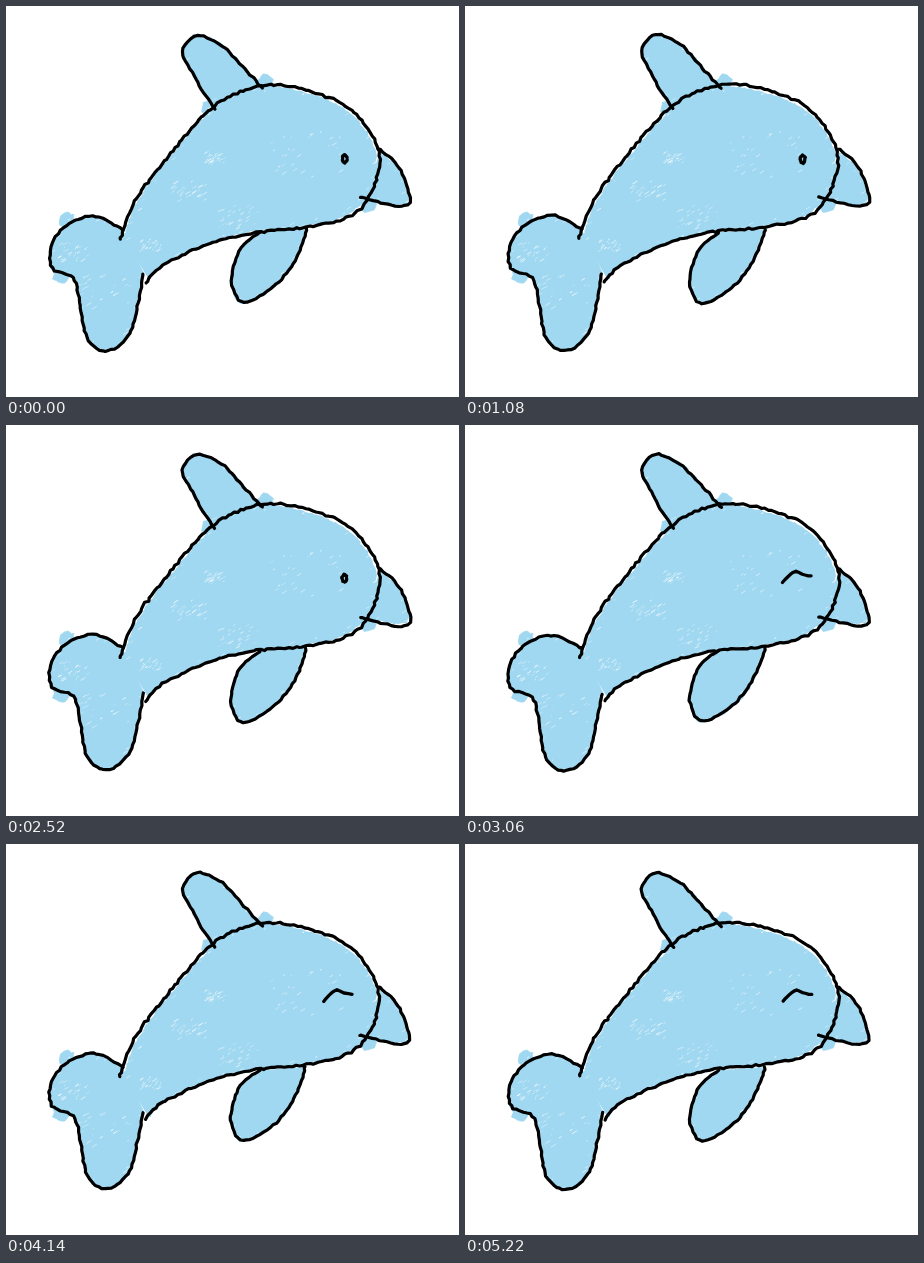
Recreate the animation shown at these times as an HTML page with a canvas. Size 453 by 391 pixels, loop 5.4 s.

```html
<!DOCTYPE html>
<html lang="en">
<head>
<meta charset="utf-8">
<title>Dolphin</title>
<style>
html, body { margin: 0; width: 100%; height: 100%; overflow: hidden; background: #fff; }
canvas { display: block; }
</style>
</head>
<body>
<canvas id="stage" width="453" height="391"></canvas>
<script>
const STEP = 180, FRAMES = 30;
const BLUE = '#a0d8f1';
const ctx = document.getElementById('stage').getContext('2d');

const body = [114,233, 129,195, 164,147, 204,103, 240,83, 275,79, 313,88, 348,106, 372,142,
  369,178, 346,209, 300,221, 244,227, 197,240, 157,259, 139,276];
const tail = [137,268, 132,297, 122,330, 100,345, 81,331, 74,296, 67,272, 46,262, 46,237,
  64,217, 90,210, 117,223];
const fin = [208,103, 188,70, 177,45, 191,29, 216,39, 238,62, 256,82];
const flipper = [254,226, 234,243, 225,276, 238,297, 270,279, 290,252, 300,223];
const beak = [373,143, 393,162, 404,192, 398,200, 378,198, 354,192];
const shapes = [body, tail, fin, flipper, beak];
const closedEye = [318,157, 323,151, 331,146, 337,149, 346,150];

// Colour outside the lines, and bare paper showing through: x, y, radius
const smudges = [61,215,8, 55,269,8, 259,77,8, 362,198,8, 203,102,7, 184,46,7];
const bare = [145,239,10, 232,212,20, 208,152,10, 68,246,15, 100,285,28, 300,148,38, 184,185,17];

function random(seed) {
  return () => {
    seed = seed + 0x6D2B79F5 | 0;
    let t = Math.imul(seed ^ seed >>> 15, 1 | seed);
    t = t + Math.imul(t ^ t >>> 7, 61 | t) ^ t;
    return ((t ^ t >>> 14) >>> 0) / 2147483648 - 1;
  };
}

function groups(list, size) {
  const out = [];
  for (let i = 0; i < list.length; i += size) out.push(list.slice(i, i + size));
  return out;
}

// Catmull-Rom curve sampled about every `gap` pixels
function sample(pts, gap) {
  const out = [], last = pts.length - 1;
  for (let i = 0; i < last; i++) {
    const a = pts[Math.max(i - 1, 0)], b = pts[i], c = pts[i + 1], d = pts[Math.min(i + 2, last)];
    const n = Math.max(1, Math.round(Math.hypot(c[0] - b[0], c[1] - b[1]) / gap));
    for (let k = 0; k < n; k++) {
      const t = k / n;
      out.push([0, 1].map(j => b[j] + t / 2 * (c[j] - a[j] +
        t * (2 * a[j] - 5 * b[j] + 4 * c[j] - d[j] + t * (3 * (b[j] - c[j]) + d[j] - a[j])))));
    }
  }
  out.push(pts[last]);
  return out;
}

const shift = (pts, rnd, size) => pts.map(([x, y]) => [x + rnd() * size, y + rnd() * size]);

function shrink(pts, scale) {
  const mid = [0, 1].map(j => pts.reduce((sum, p) => sum + p[j], 0) / pts.length);
  return pts.map(p => p.map((v, j) => mid[j] + (v - mid[j]) * scale));
}

function trace(c, pts) {
  c.beginPath();
  pts.forEach(([x, y]) => c.lineTo(x, y));
}

function ring(x, y, r) {
  return Array.from({ length: 16 }, (_, i) => [x + r * Math.cos(i * Math.PI / 8), y + r * Math.sin(i * Math.PI / 8)]);
}

function crayonLayer() {
  const layer = document.createElement('canvas');
  layer.width = 453;
  layer.height = 391;
  const c = layer.getContext('2d'), rnd = random(7);
  c.fillStyle = c.strokeStyle = BLUE;
  c.lineCap = 'round';

  const paint = (pts, rough) => {
    trace(c, shift(pts, rnd, rough));
    c.closePath();
    c.fill();
    c.stroke();
  };
  const fleck = (x, y) => {
    const len = 1.2 + rnd();
    c.globalAlpha = 0.6 + rnd() * 0.3;
    c.lineWidth = 0.75 + rnd() * 0.3;
    trace(c, [[x - len, y + len * 0.6], [x + len, y - len * 0.6]]);
    c.stroke();
  };

  c.lineWidth = 2;
  const edges = shapes.map((list, i) =>
    shrink(sample(groups(list, 2), 3), i === 0 ? 0.965 : i === 4 ? 0.88 : 0.99));
  edges.forEach(pts => paint(pts, 1));
  c.lineWidth = 0.8;
  groups(smudges, 3).forEach(s => paint(ring(...s), 1.4));

  c.globalCompositeOperation = 'destination-out';
  for (const [x, y, r] of groups(bare, 3)) {
    for (let i = 0; i < 28; i++) fleck(x + rnd() * r, y + rnd() * r * 0.6);
  }
  edges.forEach(pts => pts.forEach(([x, y], i) => {
    if (i % 3 === 0) fleck(x + rnd() * 4, y + rnd() * 4);
  }));
  return layer;
}

function ink(pts, id, frame, width, rough) {
  const sway = random(frame * 97 + id * 13 + 5), grain = random(id * 31 + 2);
  const dx = sway() * 0.6, dy = sway() * 0.7;
  const moved = shift(pts, sway, 0.45).map(([x, y]) => [x + dx, y + dy]);
  const bumpy = shift(sample(moved, 3.6), grain, rough);
  trace(ctx, shift(bumpy, sway, rough * 0.3));
  ctx.lineWidth = width;
  ctx.stroke();
}

const crayon = crayonLayer();
const openEye = ring(338.5, 153, 2.4).map(([x, y]) => [x, 153 + (y - 153) * 1.6]);
ctx.lineCap = ctx.lineJoin = 'round';
ctx.strokeStyle = '#000';
let shown = -1;

function draw(now) {
  const frame = Math.floor(now / STEP) % FRAMES;
  if (frame !== shown) {
    shown = frame;
    ctx.fillStyle = '#fff';
    ctx.fillRect(0, 0, 453, 391);
    ctx.drawImage(crayon, 0, 0);
    shapes.forEach((list, i) => ink(groups(list, 2), i, frame, 3.2, i ? 0.65 : 0.95));
    ink(frame < FRAMES / 2 ? openEye : groups(closedEye, 2), 9, frame, 3.3, 0.3);
  }
  requestAnimationFrame(draw);
}
draw(0);
</script>
</body>
</html>
```
